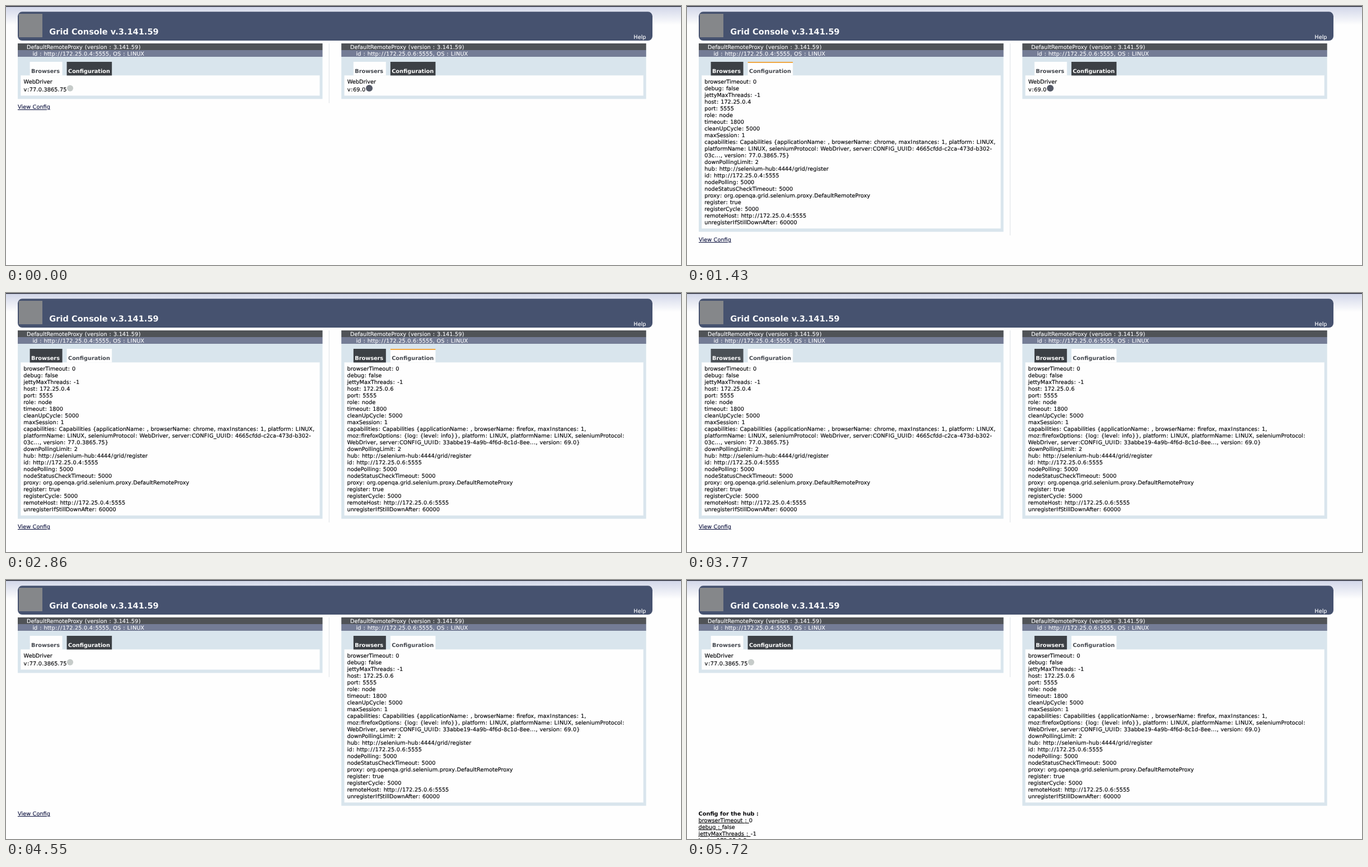
An HTML page for the animation above (8000 ms loop, 1206x464 px).

```html
<!DOCTYPE html>
<html lang="en">
<head>
<meta charset="utf-8">
<title>Grid Console</title>
<style>
  html, body { margin: 0; width: 100%; height: 100%; overflow: hidden; background: #fefefe; }
  svg { display: block; width: 100%; height: 100%; }
  text {
    font: 9.75px "DejaVu Sans", Verdana, sans-serif; word-spacing: .034em; white-space: pre;
    text-rendering: geometricPrecision;
    color: #050507; fill: currentColor; stroke: currentColor; stroke-width: .16px;
  }
  .bold { font-weight: bold; word-spacing: 0; stroke: none; }
  .light { color: #f8f9fb; }
  .title { font-size: 14.6px; }
  .link { color: #161b46; text-decoration: underline; }
  .key { text-decoration: underline; }
  .wide { letter-spacing: .058em; }
  .mid { letter-spacing: .04em; }
  .slim { letter-spacing: .023em; }
</style>
</head>
<body>
<svg id="stage" viewBox="0 0 1206 464" preserveAspectRatio="none"></svg>
<script>
const stage = document.getElementById('stage');
const LOOP = 8000;

// Scene changes: start time, open tab per node, hovered tab, hub config shown
const scenes = [
  { at: 0 },
  { at: 910, hover: 'left config' },
  { at: 1430, left: 1, hover: 'left config' },
  { at: 1820, left: 1 },
  { at: 2470, left: 1, hover: 'right config' },
  { at: 2860, left: 1, right: 1, hover: 'right config' },
  { at: 3380, left: 1, right: 1 },
  { at: 3770, left: 1, right: 1, hover: 'left browsers' },
  { at: 4160, right: 1, hover: 'left browsers' },
  { at: 4550, right: 1 },
  { at: 5590, right: 1, hub: 1 }
];

const nodes = [
  {
    side: 'left', x: 0, host: '172.25.0.4', version: '77.0.3865.75',
    icon: [114.5, 147.3, 5.6, '#c6cbc9'],
    caps: [
      'capabilities: Capabilities {applicationName: , browserName: chrome, maxInstances: 1, platform: LINUX,',
      'platformName: LINUX, seleniumProtocol: WebDriver, server:CONFIG_UUID: 4665cfdd-c2ca-473d-b302-',
      '03c..., version: 77.0.3865.75}'
    ]
  },
  {
    side: 'right', x: 578.2, host: '172.25.0.6', version: '69.0',
    icon: [70.8, 147.2, 6, '#565a68'],
    caps: [
      'capabilities: Capabilities {applicationName: , browserName: firefox, maxInstances: 1,',
      'moz:firefoxOptions: {log: {level: info}}, platform: LINUX, platformName: LINUX, seleniumProtocol:',
      'WebDriver, server:CONFIG_UUID: 33abbe19-4a9b-4f6d-8c1d-8ee..., version: 69.0}'
    ]
  }
];

const rect = (x, y, w, h, fill, extra = '') =>
  `<rect x="${x}" y="${y}" width="${w}" height="${h}" fill="${fill}" ${extra}/>`;

// Gives punctuation the roomier spacing of the page's typeface, half on each side
const spaced = s => s.replace(/[:\/I]|[-()]|[.,]/g, c => {
  const [cls, dx] = ':/I'.includes(c) ? ['wide', .058] : '-()'.includes(c) ? ['mid', .04] : ['slim', .023];
  return `<tspan class="${cls}" dx="${dx}em">${c}</tspan>`;
});

const text = (x, y, s, cls = '', extra = '') =>
  `<text x="${x}" y="${y}" class="${cls}" ${extra}>${cls.includes('bold') ? s : spaced(s)}</text>`;

const configLines = n => [
  'browserTimeout: 0', 'debug: false', 'jettyMaxThreads: -1', `host: ${n.host}`,
  'port: 5555', 'role: node', 'timeout: 1800', 'cleanUpCycle: 5000', 'maxSession: 1',
  ...n.caps,
  'downPollingLimit: 2', 'hub: http://selenium-hub:4444/grid/register',
  `id: http://${n.host}:5555`, 'nodePolling: 5000', 'nodeStatusCheckTimeout: 5000',
  'proxy: org.openqa.grid.selenium.proxy.DefaultRemoteProxy', 'register: true',
  'registerCycle: 5000', `remoteHost: http://${n.host}:5555`, 'unregisterIfStillDownAfter: 60000'
];

function tab(x, w, label, active, hover) {
  const fill = active ? '#fefefe' : hover ? '#4a5056' : '#3c4045';
  return rect(x, 100, w, 24.5, fill)
    + (active && hover ? rect(x, 100, w, 2, '#efa742') : '')
    + text(x + 2.4, 120.4, label, 'bold', `style="color:${active ? '#43474e' : '#fff'}"`);
}

function panel(n, scene) {
  const open = scene[n.side];
  const grow = open ? 238 : 0;
  const hover = name => scene.hover === `${n.side} ${name}`;
  const [cx, cy, r, fill] = n.icon;
  const body = open
    ? configLines(n).map((s, i) => text(31.3, 139 + i * 12, s)).join('')
    : text(31.6, 139, 'WebDriver') + text(31.6, 153.2, `v:${n.version}`)
      + `<circle cx="${cx}" cy="${cy}" r="${r}" fill="${fill}"/>`;
  return `<g transform="translate(${n.x} 0)">`
    + rect(21, 67, 544.5, 99.5 + grow, '#d9e5ed')
    + rect(21, 67, 544.5, 12, '#505357')
    + rect(21, 79, 544.5, 12, '#747c95')
    + text(36.9, 77, 'DefaultRemoteProxy (version : 3.141.59)', 'light')
    + text(47.4, 89, `id : http://${n.host}:5555, OS : LINUX`, 'light')
    + rect(26.3, 124.3, 534.2, 36.3 + grow, '#fefefe')
    + tab(42.6, 58, 'Browsers', !open, hover('browsers'))
    + tab(108.6, 80.6, 'Configuration', open, hover('config'))
    + body + '</g>';
}

function footer(scene) {
  if (!scene.hub) return text(21, scene.left || scene.right ? 422 : 184.2, 'View Config', 'link');
  const rows = [['browserTimeout', '0'], ['debug', 'false'], ['jettyMaxThreads', '-1'], ['host', '172.25.0.2']];
  return text(20.6, 422, 'Config for the hub :', 'bold') + rows.map(([key, value], i) =>
    `<text x="20.6" y="${434 + i * 12}"><tspan class="key">${spaced(key + ' : ')}</tspan>${spaced(value)}</text>`
  ).join('');
}

const backdrop =
  `<defs><linearGradient id="sky" x2="0" y2="1"><stop stop-color="#d0d5e8"/>
   <stop offset="1" stop-color="#fefefe"/></linearGradient></defs>`
  + rect(0, 0, 1206, 464, '#fefefe')
  + rect(0, 0, 1206, 34, 'url(#sky)')
  + rect(0, 0, 1206, 1.4, '#1d1f2b')
  + rect(21, 10.3, 1134, 51.7, '#46526f', 'rx="8"')
  + rect(23, 14, 42, 42, '#85878a')
  + text(77.3, 51.2, 'Grid Console v.3.141.59', 'bold light title')
  + text(1121.3, 59.4, 'Help', 'light');

function draw(scene) {
  stage.innerHTML = backdrop
    + nodes.map(n => panel(n, scene)).join('')
    + rect(576.8, 67, 1, scene.left ? 344 : 107, '#dde0e6')
    + footer(scene);
}

let shown;
const start = performance.now();

function tick() {
  const t = (performance.now() - start) % LOOP;
  const scene = scenes.filter(s => s.at <= t).pop();
  if (scene !== shown) draw(shown = scene);
  requestAnimationFrame(tick);
}
tick();
</script>
</body>
</html>
```
